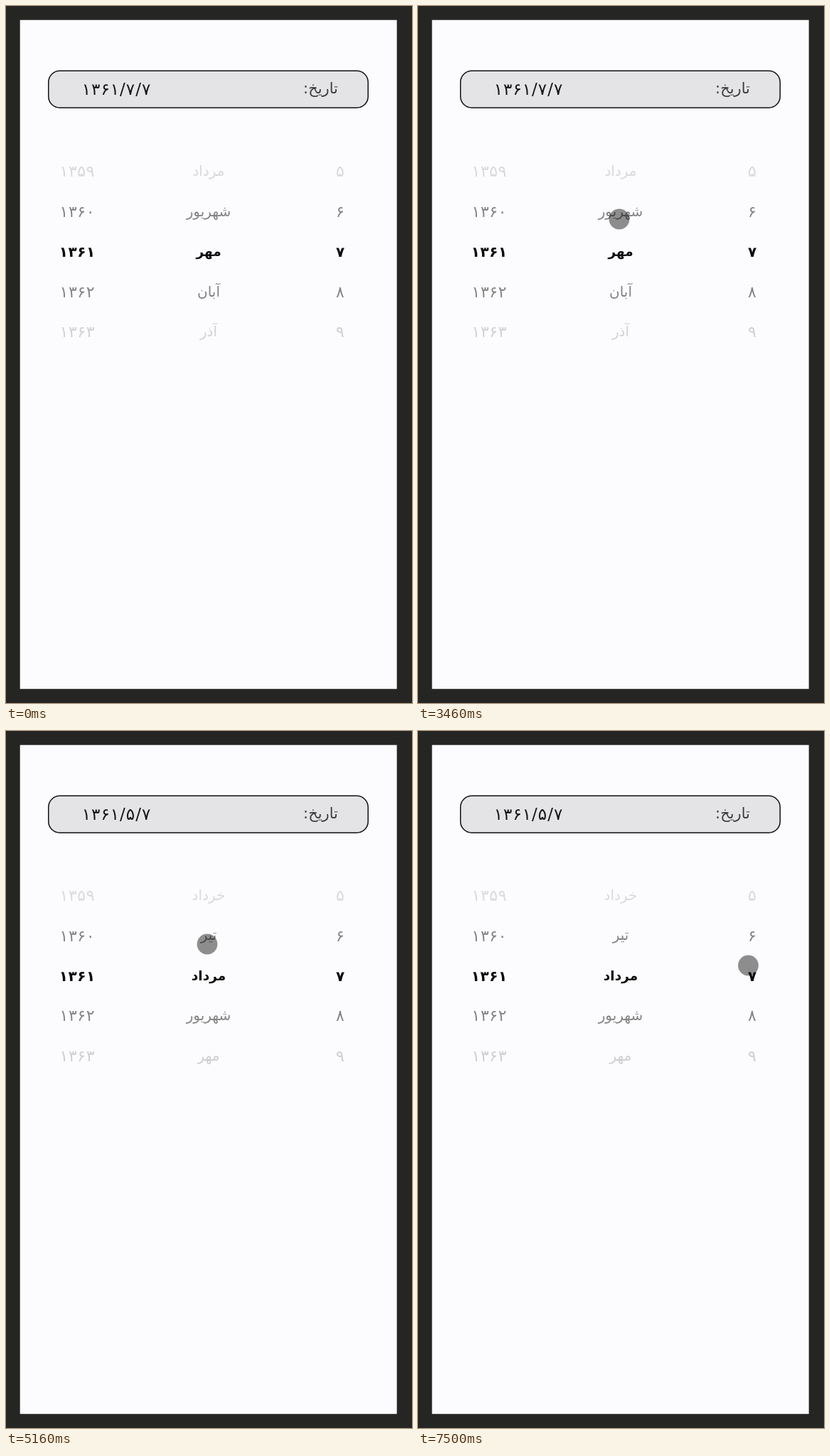
Animation of 571x981 px, one loop 8000 ms. Source, as an HTML page with a canvas:

```html
<!DOCTYPE html>
<html lang="fa">
<head>
<meta charset="utf-8">
<title>Date picker</title>
<style>
html, body { margin: 0; width: 100%; height: 100%; overflow: hidden; background: #252523; }
canvas { display: block; }
</style>
</head>
<body>
<canvas id="stage" width="571" height="981"></canvas>
<script>
const ctx = document.getElementById('stage').getContext('2d');
const LOOP = 8000;
const ROW = 56.4;
const MONTHS = ['فروردین', 'اردیبهشت', 'خرداد', 'تیر', 'مرداد', 'شهریور',
  'مهر', 'آبان', 'آذر', 'دی', 'بهمن', 'اسفند'];

// [time, x, y]
const CURSOR = [
  [400, 542, 536], [1200, 269.5, 314], [1400, 232, 336], [1650, 279, 275],
  [1800, 268.5, 288.5], [2080, 268.5, 288.5], [2740, 277, 300]
];
const TOUCH = [
  [3460, 283, 300], [5260, 283, 300], [5540, 285.5, 300], [6420, 285.5, 300],
  [6940, 467, 337], [7120, 467, 337], [7500, 464.5, 330]
];
// distance from the list centre -> opacity
const FADE = [[70, 0.5], [100, 0.25], [113, 0.16], [124, 0.1], [144, 0]];

const clamp = v => Math.max(0, Math.min(1, v));
const progress = (t, from, to) => clamp((t - from) / (to - from));
const easeOut = p => 1 - (1 - p) ** 2;
const smooth = p => p * p * (3 - 2 * p);
const farsi = n => String(n).replace(/\d/g, d => String.fromCharCode(0x6f0 + +d));

function along(keys, v, ease = p => p) {
  if (v <= keys[0][0]) return keys[0].slice(1);
  for (let i = 1; i < keys.length; i++) {
    const a = keys[i - 1], b = keys[i];
    if (v <= b[0]) {
      const p = ease(progress(v, a[0], b[0]));
      return a.slice(1).map((n, k) => n + (b[k + 1] - n) * p);
    }
  }
  return keys[keys.length - 1].slice(1);
}

function write(text, x, y, size, bold, color) {
  ctx.font = `${bold ? 'bold ' : ''}${size}px "DejaVu Sans", sans-serif`;
  ctx.fillStyle = color;
  ctx.fillText(text, x, y);
}

function column(x, pos, mid, label, size, boldSize, drop) {
  const nearest = Math.round(pos);
  for (let i = nearest - 3; i <= nearest + 3; i++) {
    const text = label(i);
    if (!text) continue;
    const y = mid + (i - pos) * ROW;
    const chosen = i === nearest;
    const alpha = chosen ? 1 : along(FADE, Math.abs(y - 348))[0];
    if (alpha > 0) {
      write(text, x, y + drop, chosen ? boldSize : size, chosen, `rgba(12,12,12,${alpha})`);
    }
  }
}

function moveCursor(x, y) {
  ctx.save();
  ctx.translate(x, y);
  ctx.beginPath();
  for (let i = 0; i < 4; i++) {
    ctx.lineTo(-1.4, -1.4);
    ctx.lineTo(-1.4, -6);
    ctx.lineTo(-4.6, -6);
    ctx.lineTo(0, -10.8);
    ctx.lineTo(4.6, -6);
    ctx.lineTo(1.4, -6);
    ctx.rotate(Math.PI / 2);
  }
  ctx.closePath();
  ctx.lineWidth = 1.6;
  ctx.strokeStyle = '#fcfcfd';
  ctx.stroke();
  ctx.fillStyle = '#000';
  ctx.fill();
  ctx.restore();
}

function monthAt(t) {
  const over = 21 / ROW;
  const scroll = (2 + over) * easeOut(progress(t, 3600, 4320));
  const settle = over * easeOut(progress(t, 4420, 5160));
  return 7 - scroll + settle;
}

function draw(t) {
  const month = monthAt(t);
  const mid = t < 3600 ? 345.7 : 344.4;

  ctx.fillStyle = '#252523';
  ctx.fillRect(0, 0, 571, 981);
  ctx.fillStyle = '#fcfcfe';
  ctx.fillRect(19.7, 19.7, 530, 941.5);

  ctx.beginPath();
  ctx.roundRect(59.75, 91.25, 449.5, 52, 16);
  ctx.fillStyle = '#e4e4e7';
  ctx.fill();
  ctx.lineWidth = 1.5;
  ctx.strokeStyle = '#111';
  ctx.stroke();

  ctx.textAlign = 'center';
  ctx.textBaseline = 'alphabetic';
  ctx.direction = 'rtl';
  write('تاریخ:', 442.5, 123, 21, false, '#3c3c3e');
  ctx.direction = 'ltr';
  ctx.letterSpacing = '1px';
  write(`${farsi(1361)}/${farsi(Math.round(month))}/${farsi(7)}`, 155.5, 125, 23, false, '#151515');

  ctx.letterSpacing = '0.6px';
  column(100.3, 1361, mid, farsi, 22, 20, 7.5);
  ctx.letterSpacing = '0px';
  column(470, 7, mid, farsi, 22, 20, 7.5);
  ctx.direction = 'rtl';
  column(285, month, mid, i => MONTHS[i - 1], 20, 18.5, 6.4);

  if (t >= 400 && t < 3460) {
    moveCursor(...along(CURSOR, t, smooth));
  } else if (t >= 3460) {
    const [x, y] = along(TOUCH, t, smooth);
    ctx.beginPath();
    ctx.arc(x, y, 14.4, 0, Math.PI * 2);
    ctx.fillStyle = 'rgba(0,0,0,0.44)';
    ctx.fill();
  }
}

const start = performance.now();
function tick() {
  draw((performance.now() - start) % LOOP);
  requestAnimationFrame(tick);
}
tick();
</script>
</body>
</html>
```
